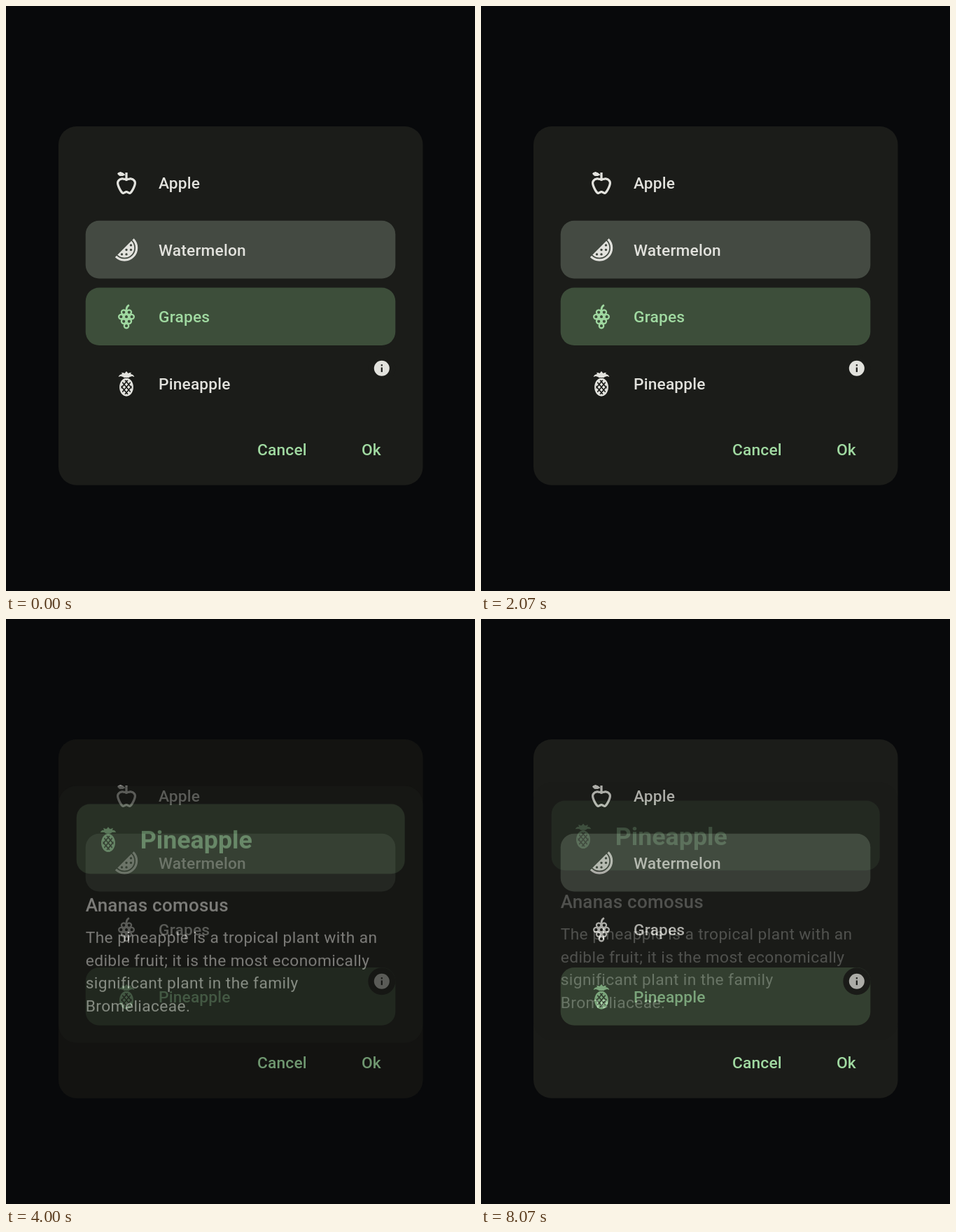
Recreate the animation shown at these times as an HTML page with a canvas. Size 670 by 836 pixels, loop 8140 ms.

```html
<!DOCTYPE html>
<html lang="en">
<head>
<meta charset="utf-8">
<title>Fruit picker</title>
<style>
  html, body { margin: 0; width: 100%; height: 100%; overflow: hidden; background: #08090b; }
  canvas { display: block; width: 670px; height: 836px; }
</style>
</head>
<body>
<canvas id="stage" width="670" height="836"></canvas>
<script>
const W = 670, H = 836, LOOP = 8140, FPS = 15;
const DP = 1.625;
const BACK = '#08090b', PANEL = '#1b1c19', CHIP = '#444a42', PICKED = '#3d4e3a';
const INK = '#e2e2dd', GREEN = '#a0d9a1';

const stage = document.getElementById('stage').getContext('2d');
const layer = makeCanvas(W, H);

function makeCanvas(w, h) {
  const c = document.createElement('canvas');
  c.width = w;
  c.height = h;
  return c.getContext('2d');
}

const clamp = (v) => Math.min(1, Math.max(0, v));
const easeOut = (u) => 1 - (1 - u) ** 3;

function box(g, x, y, w, h, r, color) {
  g.beginPath();
  g.roundRect(x, y, w, h, r);
  g.fillStyle = color;
  g.fill();
}

function disc(g, x, y, r, color) {
  g.beginPath();
  g.arc(x, y, r, 0, Math.PI * 2);
  g.fillStyle = color;
  g.fill();
}

function text(g, str, x, y, color, sp = 14, weight = 500, track = 0.1) {
  g.font = `${weight} ${sp * DP}px Roboto, sans-serif`;
  g.letterSpacing = `${track * DP}px`;
  g.fillStyle = color;
  g.fillText(str, x, y);
}

// Icons live on a 24 x 24 grid.
const icons = {
  apple(g) {
    g.lineWidth = 2;
    g.stroke(new Path2D('M19.2 10.5C20.9 13 16.4 21 15 21C13.7 21 13.5 20 12 20' +
      'C10.5 20 10.3 21 9 21C7.6 21 3.1 13 4.8 10.5C6.5 8 9.3 8 12 9.3C14.7 8 17.5 8 19.2 10.5Z'));
    g.fill(new Path2D('M11 9V5C5.38 8.07 4.11 3.78 4.11 3.78C4.11 3.78 6.77 .19 11 5V3H13V9Z'));
  },
  melon(g) {
    const from = -Math.PI / 4, to = Math.PI * 0.75;
    g.lineWidth = 2;
    g.beginPath();
    g.arc(10.3, 10.3, 10.7, from, to);
    g.stroke();
    g.beginPath();
    g.arc(10.3, 10.3, 8.65, from, to);
    g.fill();
    g.globalCompositeOperation = 'destination-out';
    for (const [x, y] of [[16, 8], [16, 12], [12, 12], [12, 16], [8, 16]]) disc(g, x, y, 1, '#000');
  },
  grapes(g) {
    g.lineWidth = 1.45;
    [2, 3, 2, 1].forEach((count, row) => {
      for (let i = 0; i < count; i++) {
        g.beginPath();
        g.arc(12 + (i - (count - 1) / 2) * 4.7, 8 + row * 4, 1.95, 0, Math.PI * 2);
        g.stroke();
      }
    });
    g.lineWidth = 1.7;
    g.stroke(new Path2D('M12 7C11.8 4.2 12.6 2.6 14.4 1.7'));
  },
  pineapple(g) {
    g.beginPath();
    g.ellipse(12, 15, 6.1, 8, 0, 0, Math.PI * 2);
    g.fill();
    g.fill(new Path2D('M12 1L13.5 2.8L16.2 2L15.7 3.7C17.4 3.5 18.5 4.6 18.9 5.9' +
      'C16.9 5.2 15.2 5.6 14 6.7H10C8.8 5.6 7.1 5.2 5.1 5.9C5.5 4.6 6.6 3.5 8.3 3.7L7.8 2L10.5 2.8Z'));
    g.globalCompositeOperation = 'destination-out';
    g.lineWidth = 1;
    g.beginPath();
    g.ellipse(12, 15, 4.7, 6.4, 0, 0, Math.PI * 2);
    g.clip();
    g.beginPath();
    for (const c of [-4.8, 0, 4.8]) {
      g.moveTo(6, 15 + c - 7.2);
      g.lineTo(18, 15 + c + 7.2);
      g.moveTo(18, 15 + c - 7.2);
      g.lineTo(6, 15 + c + 7.2);
    }
    g.stroke();
  }
};

const sprites = {};
function icon(g, name, cx, cy, color) {
  const key = name + color;
  if (!sprites[key]) {
    const s = makeCanvas(80, 80);
    s.scale(DP * 2, DP * 2);
    s.translate(0.31, 0.31);
    s.fillStyle = s.strokeStyle = color;
    icons[name](s);
    sprites[key] = s.canvas;
  }
  g.drawImage(sprites[key], cx - 20, cy - 20, 40, 40);
}

const rows = [
  { label: 'Apple', icon: 'apple' },
  { label: 'Watermelon', icon: 'melon' },
  { label: 'Grapes', icon: 'grapes' },
  { label: 'Pineapple', icon: 'pineapple' }
].map((row, i) => ({ ...row, y: 211 + i * 95.7 }));

const taps = [
  { at: 0, row: 2, x: 320 },
  { at: 10 / FPS * 1000, row: 0, x: 320 },
  { at: 31 / FPS * 1000, row: 2, x: 320 },
  { at: 44 / FPS * 1000, row: 3, x: 299 }
];
const RIPPLE = 730, SHEET_IN = 3867, SHEET_OUT = 7867;

function ripple(g, tap, age) {
  if (age <= 0 || age >= RIPPLE) return;
  const { y } = rows[tap.row];
  const grow = clamp(age / 450);
  const radius = 395 * (1 - (1 - grow) ** 2);
  const alpha = 0.23 * clamp(age / 80) * clamp((RIPPLE - age) / 340);
  const cy = y + 41.3;
  const shade = g.createRadialGradient(tap.x, cy, 0, tap.x, cy, radius);
  const tint = (a) => `rgba(250,250,250,${alpha * a})`;
  [[0, 1], [0.48, 1], [0.6, 0.75], [0.78, 0.3], [0.9, 0.07], [1, 0]]
    .forEach(([stop, a]) => shade.addColorStop(stop, tint(a)));
  box(g, 113.7, y, 442.6, 82.7, 19.5, shade);
}

function drawPicker(g, t) {
  const picked = taps.filter((tap) => tap.at <= t).pop().row;
  box(g, 75, 172, 520.5, 512.8, 26, PANEL);
  rows.forEach(({ y }, i) => {
    const fill = i === picked ? PICKED : i === 1 ? CHIP : null;
    if (fill) box(g, 113.7, y, 442.6, 82.7, 19.5, fill);
  });
  taps.forEach((tap) => ripple(g, tap, t - tap.at));
  rows.forEach((row, i) => {
    const color = i === picked ? GREEN : INK;
    icon(g, row.icon, 172, row.y + 41.7, color);
    text(g, row.label, 218, row.y + 50, color);
  });
  disc(g, 536.8, 517.7, 19.5, PANEL);
  disc(g, 536.8, 517.7, 11, INK);
  g.fillStyle = PANEL;
  g.fillRect(535.7, 516.5, 2.2, 6.6);
  g.fillRect(535.7, 512.2, 2.2, 2.2);
  text(g, 'Cancel', 359, 642, GREEN);
  text(g, 'Ok', 508, 642, GREEN);
}

function drawSheet(g) {
  g.clearRect(0, 0, W, H);
  box(g, 75, 244.5, 520.5, 367.5, 26, PANEL);
  box(g, 100.7, 270.5, 469, 99.7, 19.5, PICKED);
  icon(g, 'pineapple', 146, 321.2, GREEN);
  text(g, 'Pineapple', 191.7, 334.3, GREEN, 22, 700, 0);
  text(g, 'Ananas comosus', 113.7, 424.3, INK, 16, 500, 0.15);
  [
    'The pineapple is a tropical plant with an',
    'edible fruit; it is the most economically',
    'significant plant in the family',
    'Bromeliaceae.'
  ].forEach((line, i) => text(g, line, 113.7, 469 + i * 32.5, INK, 14, 400, 0.25));
}

function sheetPose(t) {
  if (t < SHEET_OUT) {
    const age = t - SHEET_IN;
    return {
      alpha: clamp(age / 260),
      shift: -15 * (1 - easeOut(clamp(age / 520))),
      dim: 0.6 * clamp(age / 260)
    };
  }
  const out = (t - SHEET_OUT) / 200;
  return { alpha: clamp(1 - 0.73 * out), shift: -11 * out ** 1.6, dim: 0 };
}

function draw(t) {
  stage.fillStyle = BACK;
  stage.fillRect(0, 0, W, H);
  drawPicker(stage, t);
  const { alpha, shift, dim } = sheetPose(t);
  if (!alpha) return;
  box(stage, 75, 172, 520.5, 512.8, 26, `rgba(0,0,0,${dim})`);
  drawSheet(layer);
  stage.globalAlpha = alpha;
  stage.drawImage(layer.canvas, 0, shift);
  stage.globalAlpha = 1;
}

const start = performance.now();
function tick() {
  const t = (performance.now() - start) % LOOP;
  const step = Math.min(121, Math.floor((t + 4) * FPS / 1000));
  draw(step * 1000 / FPS + 0.01);
  requestAnimationFrame(tick);
}
tick();
</script>
</body>
</html>
```
